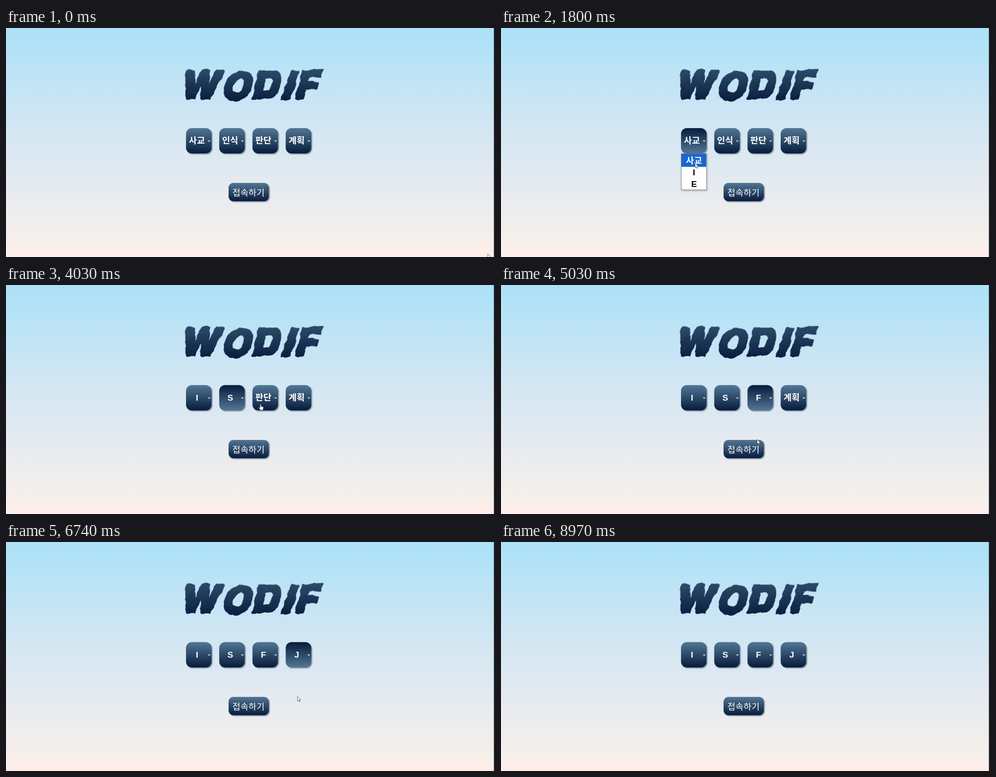
An HTML page for the animation above (9.02 s loop, 1092x513 px).

```html
<!DOCTYPE html>
<html lang="ko">
<head>
<meta charset="utf-8">
<title>WODIF</title>
<style>
  html, body { margin: 0; width: 100%; height: 100%; overflow: hidden; background: #abe1f8; }
  svg { display: block; width: 1092px; height: 513px; }
  text { text-anchor: middle; font-family: "Liberation Sans", "Noto Sans CJK KR", "Noto Sans CJK", sans-serif; }
  .ko { font-family: "Noto Sans CJK KR", "Noto Sans CJK", sans-serif; font-size: 19.5px; }
  .bold { font-weight: 700; }
  .latin { font-size: 19px; font-weight: 700; }
  .title { font: italic 800 82px Inter, sans-serif; letter-spacing: 7px;
    fill: url(#ink); stroke: url(#ink); stroke-width: 6px; stroke-linejoin: round; filter: url(#rough); }
  .face { fill: url(#up); filter: drop-shadow(2px 2px 1px rgba(50, 60, 80, .55)); }
  .on > .face { fill: url(#down); }
  .label { fill: #fff; }
  .arrow { fill: none; stroke: #fff; stroke-width: 1.3px; }
  .sheet { fill: #fff; stroke: #767b82; filter: drop-shadow(1px 2px 2px rgba(0, 0, 0, .25)); }
  .mark { fill: #1967d2; }
  .cursor path { fill: #fff; stroke: #15181f; stroke-width: .7px; stroke-linejoin: round; }
</style>
</head>
<body>
<svg viewBox="0 0 1092 513">
  <defs>
    <linearGradient id="sky" x2="0" y2="1">
      <stop stop-color="#abe1f8"/>
      <stop offset=".4" stop-color="#d0e6f3"/>
      <stop offset=".6" stop-color="#dfe9f1"/>
      <stop offset=".78" stop-color="#ececee"/>
      <stop offset=".93" stop-color="#f6efea"/>
      <stop offset=".97" stop-color="#fdeeea"/>
      <stop offset="1" stop-color="#feede9"/>
    </linearGradient>
    <linearGradient id="up" x2="0" y2="1">
      <stop stop-color="#527795"/><stop offset=".96" stop-color="#0a1f40"/>
    </linearGradient>
    <linearGradient id="down" x2="0" y2="1">
      <stop offset=".04" stop-color="#0a1f40"/><stop offset="1" stop-color="#527795"/>
    </linearGradient>
    <linearGradient id="ink" gradientUnits="userSpaceOnUse" x1="0" y1="-66" x2="0" y2="2">
      <stop stop-color="#2d4c69"/><stop offset="1" stop-color="#0a2042"/>
    </linearGradient>
    <filter id="rough" filterUnits="userSpaceOnUse" x="-200" y="-90" width="400" height="115" color-interpolation-filters="sRGB">
      <feTurbulence type="fractalNoise" baseFrequency=".05" numOctaves="2" seed="4"/>
      <feDisplacementMap in="SourceGraphic" scale="9" xChannelSelector="R" yChannelSelector="G"/>
    </filter>
  </defs>
  <rect width="1092" height="513" fill="url(#sky)"/>
  <rect x="1089.6" width="2.4" height="513" fill="#10161a"/>
  <g transform="translate(546 158) skewX(-8)">
    <text class="title" rotate="-2 3 -2 2 -3">WODIF</text>
  </g>
  <g id="enter">
    <rect class="face" x="497" y="347" width="90" height="41" rx="11"/>
    <text class="label ko" x="541.5" y="375.5">접속하기</text>
  </g>
  <g id="selects"></g>
  <g class="cursor" id="cursor">
    <path id="pointer" d="M0 0V10.5L2.4 8.2 4.1 12 5.8 11.3 4.1 7.6H7.4Z"/>
    <path id="hand" d="M-1.2 1Q-1-.3 0-.3 1.1-.3 1.2 1L1.4 5 5 5.8Q6.6 6.2 6.5 8L5.8 11 5 13.6H-.5L-1.5 11.5-4.3 8Q-4.6 6.6-3 6.8L-1.2 8.4Z"/>
  </g>
</svg>
<script>
const LOOP = 9020;
const $ = id => document.getElementById(id);

// times in ms: focus, list opens, choice made, focus lost
const selects = [
  { options: ['사교', 'I', 'E'], pick: 1, focus: 1190, open: 1260, close: 2060, blur: 2800 },
  { options: ['인식', 'S', 'N'], pick: 1, focus: 2800, open: 2870, close: 3560, blur: 4220 },
  { options: ['판단', 'T', 'F'], pick: 2, focus: 4220, open: 4290, close: 5030, blur: 5580 },
  { options: ['계획', 'P', 'J'], pick: 2, focus: 5580, open: 5650, close: 6610, blur: 8970 }
];

// cursor path: time, x, y
const path = [
  [70, 1076, 506], [920, 440, 266], [990, 441, 262], [1600, 441, 262],
  [1920, 430, 321], [2060, 430, 321], [2530, 501.5, 257.5], [2800, 503, 264],
  [2870, 503, 264], [3010, 503, 288], [3360, 503, 322], [3560, 503, 322],
  [4030, 568.5, 267], [4290, 568.5, 267], [4430, 570, 318], [4490, 570, 318],
  [4770, 572, 346], [5030, 572, 346], [5500, 648, 268], [5650, 648, 268],
  [5880, 651, 296], [5950, 651, 300], [6280, 651, 346], [7140, 651, 346],
  [7620, 567, 364.5], [8210, 567, 364.5], [8420, 950, 505]
];

const rowTops = [282, 311, 337, 362.5];
const left = i => 402 + i * 74.2;

const label = (text, x, mid, cls = '') => {
  const ko = text > '가';
  return `<text class="${cls} ${ko ? 'ko bold' : 'latin'}" x="${x}" y="${mid + (ko ? 7.3 : 6.8)}">${text}</text>`;
};

$('selects').innerHTML = selects.map(({ options, pick }, i) => {
  const x = left(i);
  const rows = options.map((o, r) => label(o, x + 29, [296.7, 323.3, 349][r], 'row')).join('');
  return `<g>
    <rect class="face" x="${x}" y="224.3" width="57" height="56.7" rx="13"/>
    ${label(options[0], x + 24.3, 251.5, 'label before')}
    ${label(options[pick], x + 24.6, 252.5, 'label after')}
    <path class="arrow" d="M${x + 49.3} 251.6l2.4 2.4 2.4-2.4"/>
    <g class="list">
      <rect class="sheet" x="${x + .5}" y="281.5" width="56.5" height="81"/>
      <rect class="mark" x="${x + 1}" width="55.5"/>
      ${rows}
    </g>
  </g>`;
}).join('');

selects.forEach((s, i) => {
  const g = $('selects').children[i];
  const find = q => g.querySelector(q);
  Object.assign(s, { g, x: left(i), before: find('.before'), after: find('.after'),
    list: find('.list'), mark: find('.mark'), rows: g.querySelectorAll('.row') });
});

const show = (el, on) => { el.style.display = on ? '' : 'none'; };
const within = (x, y, l, t, w, h) => x >= l && x <= l + w && y >= t && y <= t + h;

function cursorAt(t) {
  const next = path.findIndex(p => p[0] > t);
  if (next < 1) return (next ? path[path.length - 1] : path[0]).slice(1);
  const [t0, x0, y0] = path[next - 1], [t1, x1, y1] = path[next];
  const k = (t - t0) / (t1 - t0), e = k * k * (3 - 2 * k);
  return [x0 + (x1 - x0) * e, y0 + (y1 - y0) * e];
}

function render(t) {
  const [x, y] = cursorAt(t);
  let listOpen = false, overSelect = false;

  for (const s of selects) {
    const open = t >= s.open && t < s.close;
    listOpen ||= open;
    overSelect ||= within(x, y, s.x, 224, 58, 57);
    s.g.classList.toggle('on', t >= s.focus && t < s.blur);
    show(s.before, t < s.close);
    show(s.after, t >= s.close);
    show(s.list, open);
    const row = y < rowTops[1] ? 0 : y < rowTops[2] ? 1 : 2;
    s.mark.setAttribute('y', rowTops[row]);
    s.mark.setAttribute('height', rowTops[row + 1] - rowTops[row]);
    s.rows.forEach((el, r) => el.setAttribute('fill', r === row ? '#fff' : '#000'));
  }

  const overEnter = t < 8210 && within(x, y, 497, 347, 90, 41);
  $('enter').classList.toggle('on', overEnter);
  const hand = t >= 990 && !listOpen && (overSelect || overEnter);
  show($('hand'), hand);
  show($('pointer'), !hand);
  show($('cursor'), t < 8420);
  $('cursor').setAttribute('transform', `translate(${x} ${y})`);
}

const start = performance.now();
function tick() {
  render((performance.now() - start) % LOOP);
  requestAnimationFrame(tick);
}
tick();
</script>
</body>
</html>
```
